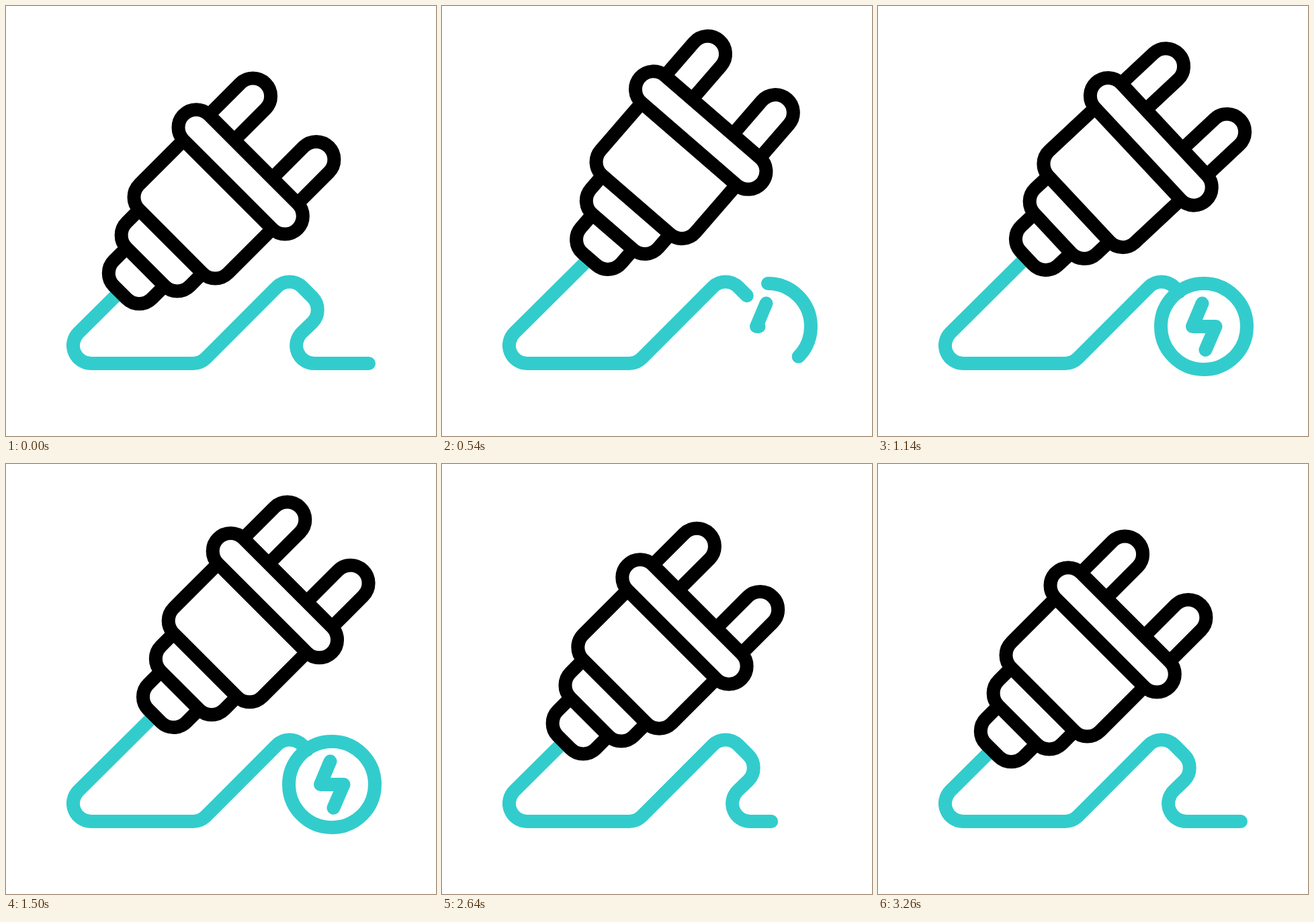
Recreate the animation shown at these times as an HTML page. Size 640 px wide and 640 px high, loop 3620 ms.

```html
<!DOCTYPE html>
<html lang="en">
<head>
<meta charset="utf-8">
<title>Plug</title>
<style>
html, body { margin: 0; width: 100%; height: 100%; overflow: hidden; background: #fff; }
svg { display: block; width: 100%; height: 100%; fill: none; stroke-width: 20; }
.wire { stroke: #33cccc; stroke-linecap: round; stroke-linejoin: round; }
#plug { stroke: #000; fill: #fff; }
</style>
</head>
<body>
<svg viewBox="0 0 640 640">
  <g class="wire">
    <path id="cable" d="M221 374L107.8 486.4A26.7 26.7 0 0 0 126.7 532H278.5A26.7 26.7 0 0 0 297.4 524.2L403 418.4A26.7 26.7 0 0 1 441 418.4L456 433.4A26.7 26.7 0 0 1 456 471L440 486.4A26.7 26.7 0 0 0 459 532H540"/>
    <g id="badge">
      <path pathLength="1" d="M485 413a64 64 0 0 0 0 128a64 64 0 0 0 0 -128"/>
      <path pathLength="1" d="M487.5 511.7L502.5 477H468L482.5 442.5"/>
    </g>
  </g>
  <g id="plug"></g>
</svg>
<script>
const LOOP = 3620, R = 26.67, TRAVEL = 51.2, RETRACT = 219.5;
const $ = id => document.getElementById(id);
const cable = $('cable'), badge = $('badge'), plug = $('plug');
const cableLength = cable.getTotalLength();

// The plug stands upright on its cable joint; sizes are multiples of R.
const cup = (w, top, bottom) =>
  `<path d="M${-w * R} ${-top * R}V${-(bottom + 1) * R}a${R} ${R} 0 0 0 ${R} ${R}` +
  `H${(w - 1) * R}a${R} ${R} 0 0 0 ${R} ${-R}V${-top * R}"/>`;
const prong = x =>
  `<path d="M${(x - 1) * R} ${-10.5 * R}V${-12.97 * R}a${R} ${R} 0 0 1 ${2 * R} 0V${-10.5 * R}"/>`;
plug.innerHTML = cup(1.5, 2, 0) + cup(2.5, 4, 2) + cup(3.5, 8.5, 4) + prong(-2.5) + prong(2.5) +
  `<rect x="${-4.5 * R}" y="${-10.5 * R}" width="${9 * R}" height="${2 * R}" rx="${R}"/>`;

const span = (t, from, to) => Math.min(1, Math.max(0, (t - from) / (to - from)));
const smooth = u => u * u * (3 - 2 * u);

// cubic-bezier(1/3, 0, 0, 1)
function glide(u) {
  let lo = 0, hi = 1;
  for (let i = 0; i < 30; i++) {
    const s = (lo + hi) / 2;
    if (s - 2 * s * s + 2 * s ** 3 < u) lo = s; else hi = s;
  }
  return smooth(hi);
}

function tilt(t) {
  if (t < 640) return -5 * smooth(span(t, 270, 640));
  if (t < 985) return -5 + 10 * span(t, 640, 985);
  return 5 - 5 * glide(span(t, 985, 1515));
}

function draw(now) {
  const t = now % LOOP;
  const pull = glide(span(t, 0, 765)) - glide(span(t, 2240, 3260));
  const d = TRAVEL * pull;
  plug.setAttribute('transform', `translate(${170 + d} ${426 - d}) rotate(${45 + tilt(t)})`);
  cable.style.strokeDasharray = `${cableLength - RETRACT * pull} 9999`;

  const start = 1 - glide(span(t, 430, 950));
  const end = 1 - glide(span(t, 1905, 2430));
  badge.style.display = t > 430 && t < 2430 ? '' : 'none';
  for (const path of badge.children) {
    path.style.strokeDasharray = `${Math.max(0, end - start)} 3`;
    path.style.strokeDashoffset = -start;
  }
}

const begin = performance.now();
function tick() {
  draw(performance.now() - begin);
  requestAnimationFrame(tick);
}
tick();
</script>
</body>
</html>
```
